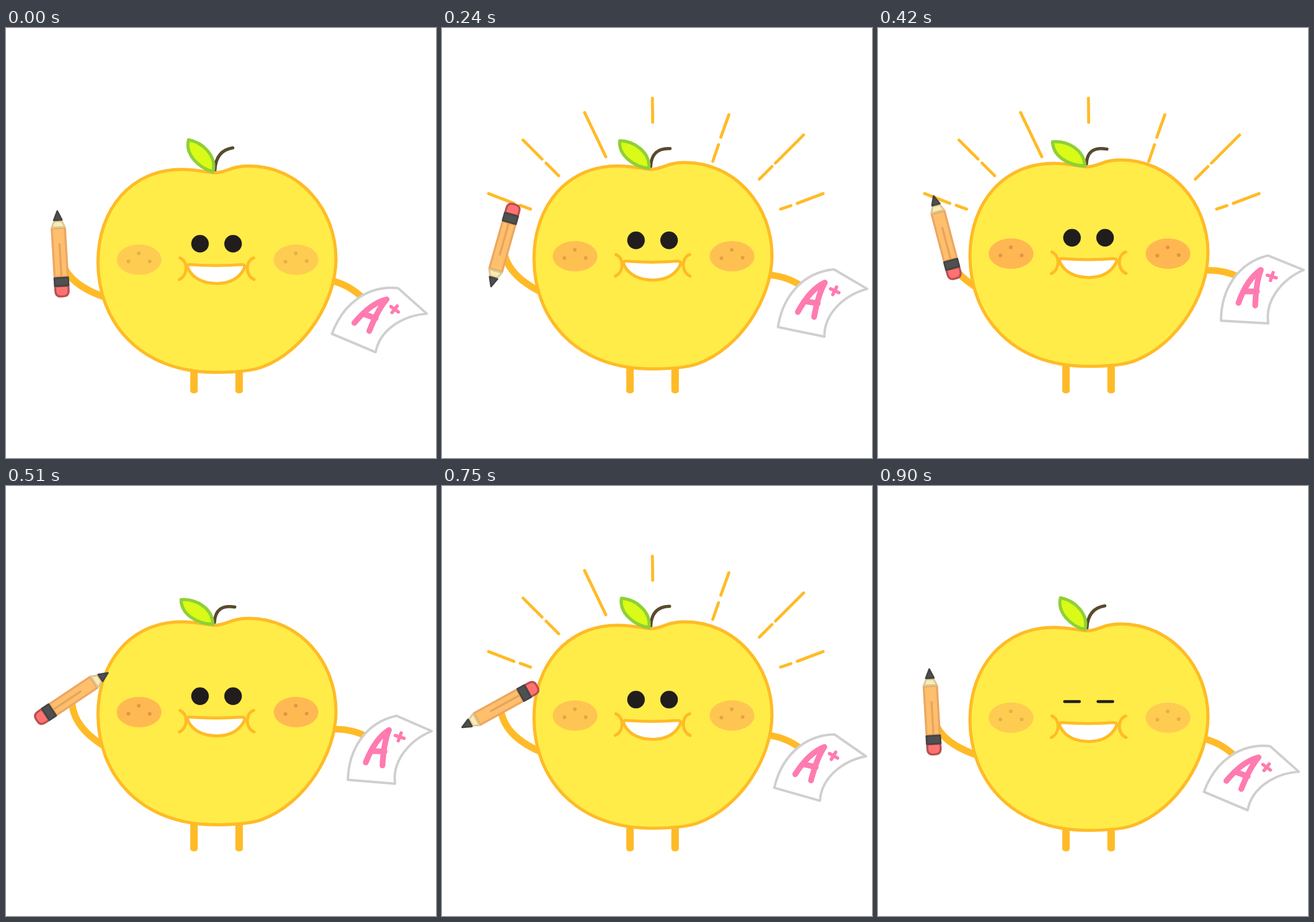
An HTML page that plays this animation: 748x748 px, repeating every 0.93 s.

```html
<!DOCTYPE html>
<html lang="en">
<head>
<meta charset="utf-8">
<title>Happy apple</title>
<style>
  html, body { margin: 0; height: 100%; overflow: hidden; background: #fff; }
  svg { display: block; width: 100vw; height: 100vh; }
  .line { fill: none; stroke: #ffbb27; stroke-width: 5.2; }
</style>
</head>
<body>
<svg viewBox="0 0 748 748" stroke-linecap="round" stroke-linejoin="round">
  <path id="rays" class="line" d="M81 288L125 305M136 308.500L154 315M141 195L174 228M181 235L203 257
    M248 147L285 224M366 122L366.500 164M499 151L485 190M481 203L471 232
    M629 186L580 235M574 241L552 263M663 288L618 305M607 309L589 315"/>
  <g fill="#ffbb27">
    <rect x="320.500" y="570" width="13" height="65.500" rx="5"/>
    <rect x="399" y="570" width="13" height="65.500" rx="5"/>
  </g>
  <g id="apple">
    <path id="leftArm" class="line" style="stroke-width:12" d="M94 394C100 432 130 455 178 470"/>
    <path id="rightArm" class="line" style="stroke-width:11.500" d="M560 438Q596 445 622 471"/>
    <path id="stem" fill="none" stroke="#594a2f" stroke-width="5.500"/>
    <path class="line" style="fill:#ffec48;stroke-width:5.500" d="M362 252C345 250 330 246 305 246C218 246 160 315 160 407
      C160 510 231 599 365 599C395 599 425 597 445 590C520 562 574 475 574 402
      C574 315 510 240 422 240C390 240 384 252 362 252Z"/>
    <path id="leaf" fill="#d9fb17" stroke="#8fd037" stroke-width="5.500"
      d="M317.500 194.500C342 199 367 222 360 250C335 243 311 220 317.500 194.500Z"/>
    <g id="cheeks">
      <ellipse cx="231.500" cy="403" rx="39" ry="26.500"/>
      <ellipse cx="504.500" cy="403" rx="39" ry="26.500"/>
    </g>
    <path id="freckles" fill="none" stroke-width="6.500"
      d="M213 406h0M231 392h0M250 406h0M486 406.500h0M504 392h0M523 405.500h0"/>
    <g id="openEyes" fill="#211d1d">
      <circle cx="337.500" cy="375.300" r="15.300"/>
      <circle cx="395" cy="375.300" r="15.300"/>
    </g>
    <path id="closedEyes" fill="none" stroke="#211d1d" stroke-width="4.800" d="M324.500 375H350.500M382.500 375H408.500"/>
    <path class="line" style="fill:#fff" d="M319 411.500Q366 415 411 411.500Q417 412 414 419
      Q401 444 367 444.500Q330 444 317 419Q314 411.500 319 411.500Z"/>
    <path class="line" d="M302.500 400C317 406 317 430 301.500 437.500M431 400C416 405 416 431 431.500 437.500"/>
    <g id="paper">
      <path fill="#fff" stroke="#cfcfcf" stroke-width="4.200"
        d="M567 532C585 482 627 447 682 452.500L732 497C690 500 650 525 643 564Z"/>
      <g fill="none" stroke="#ff7bb0">
        <path stroke-width="10" d="M606 513Q634 479 662 472Q647 489 632 527M621 497L643 505"/>
        <path stroke-width="5.800" d="M669.500 484.500L682.500 494M680.500 483.500L671.500 495"/>
      </g>
    </g>
    <g id="pencil" stroke-width="3.600">
      <path fill="#ffbf6c" stroke="#eba762" d="M-11.500 -46H11.500V39H-11.500Z"/>
      <path fill="none" stroke="#e8a35f" d="M.5 -18V38"/>
      <path fill="#faebb4" stroke="#d9c796" stroke-width="3" d="M-6.500 -58H6.500L11.500 -47.500H-11.500Z"/>
      <path fill="#4f4f4f" stroke="#444" stroke-width="3" d="M0 -75.500L7 -60H-7Z"/>
      <path fill="#ff7272" stroke="#b95151" d="M-11.500 55H11.500V63Q11.500 73 2 73H-2Q-11.500 73 -11.500 63Z"/>
      <path fill="#505050" stroke="#444" stroke-width="3" d="M-12 40.500H12V54.500H-12Z"/>
    </g>
  </g>
</svg>
<script>
  const LOOP = 930, STEP = 30, HALF = 450;
  const el = id => document.getElementById(id);
  const set = (id, name, value) => el(id).setAttribute(name, value);
  const show = (id, on) => set(id, 'visibility', on ? 'visible' : 'hidden');

  function draw(now) {
    const t = Math.floor(now % LOOP / STEP) * STEP;
    const lift = Math.max(0, 1 - Math.abs(t - HALF) / HALF);
    const leftSwing = `rotate(${13.5 * lift} 188 486)`;
    const rightSwing = `rotate(${-21 * lift} 546 440)`;

    set('apple', 'transform', `translate(0 ${-11.2 * lift})`);
    set('leaf', 'transform', `rotate(${-17 * lift} 361 251)`);
    set('stem', 'd', `M${363.5 - lift} 247Q${365 - lift} ${213 + 2 * lift} ${394.5 + 4 * lift} ${208.5 + 13.5 * lift}`);
    set('leftArm', 'transform', leftSwing);
    set('rightArm', 'transform', rightSwing);
    set('paper', 'transform', rightSwing);
    // The pencil makes two turns per loop while the hand carries it.
    set('pencil', 'transform', `${leftSwing} translate(93.7 394) rotate(${0.8 * t - 3.4})`);

    set('cheeks', 'fill', `rgb(255 ${204 - 22 * lift} 82)`);
    set('freckles', 'stroke', `rgb(230 ${176 - 32 * lift} 70)`);

    const blink = t >= 840;
    show('openEyes', !blink);
    show('closedEyes', blink);
    show('rays', t < 900 && t % HALF >= 240);
    requestAnimationFrame(() => draw(performance.now()));
  }
  draw(0);
</script>
</body>
</html>
```
